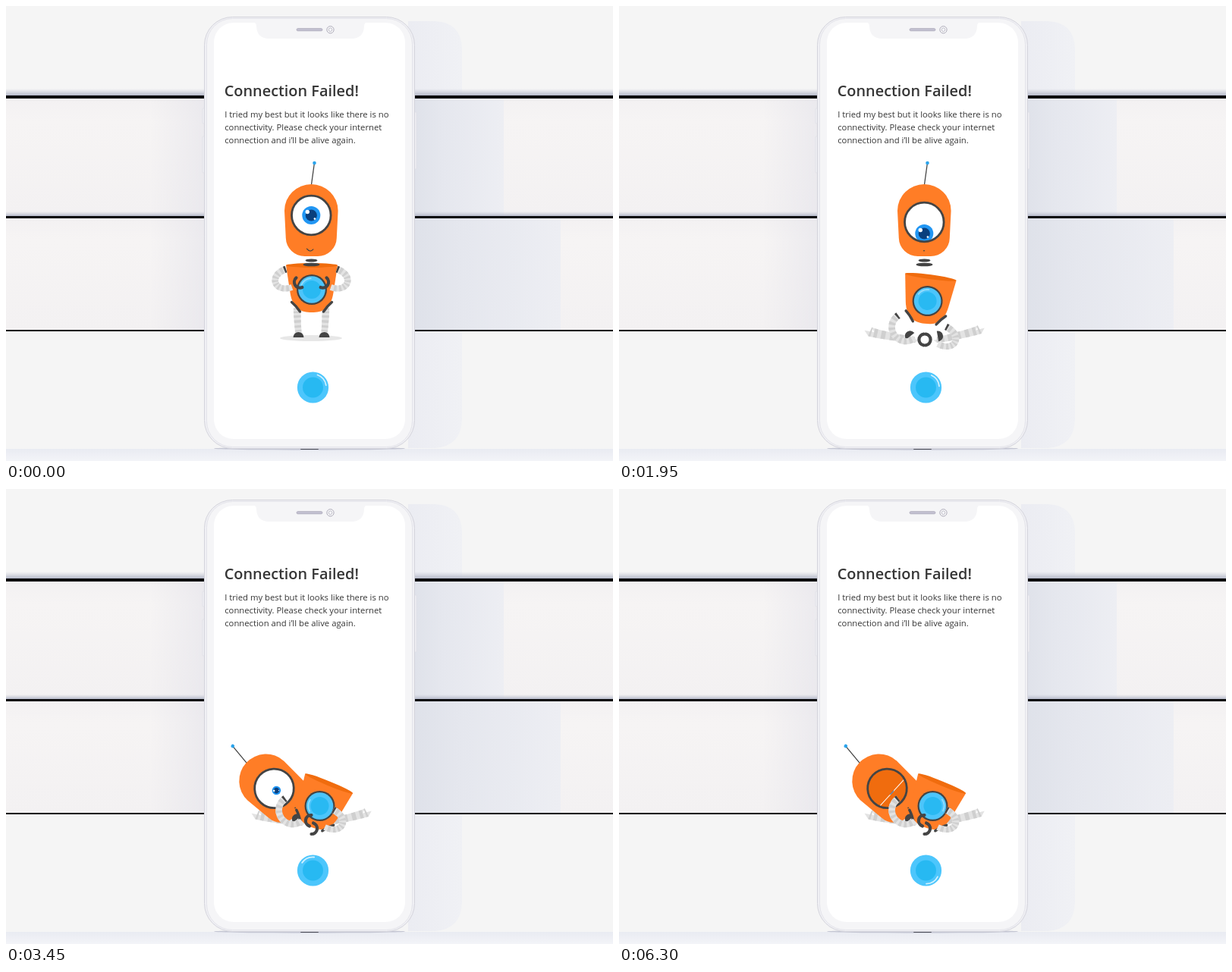
Animation, 800 px wide and 600 px high, one loop 6330 ms. Source, as an HTML page:

```html
<!DOCTYPE html>
<html lang="en">
<head>
<meta charset="utf-8">
<title>Connection Failed</title>
<style>
  html, body { margin: 0; width: 100%; height: 100%; overflow: hidden; background: #f5f5f5; }
  svg { display: block; width: 800px; height: 600px; }
  text { font-family: "Open Sans", "Noto Sans", sans-serif; fill: #363636; }
  .title { font-size: 19.9px; font-weight: 600; }
  .copy { font-size: 11.3px; }
  .dark { fill: #444; }
  .orange { fill: #ff7d26; }
  .deep { fill: #f06c0e; }
  .line { fill: none; stroke: #444; stroke-linecap: round; }
  .glint { fill: none; stroke: #fff; stroke-linecap: round; stroke-width: 1.8; opacity: .75; }
</style>
</head>
<body>
<svg viewBox="0 0 800 600">
  <defs>
    <linearGradient id="warm" x2="0" y2="1">
      <stop offset="0" stop-color="#f3f1f2"/><stop offset=".2" stop-color="#f6f4f4"/><stop offset="1" stop-color="#f3f1f2"/>
    </linearGradient>
    <linearGradient id="shade">
      <stop offset="0" stop-color="#dee1e9"/><stop offset=".35" stop-color="#e5e7ee"/><stop offset="1" stop-color="#edeef3"/>
    </linearGradient>
    <linearGradient id="soft">
      <stop offset="0" stop-color="#ebecf2"/><stop offset="1" stop-color="#f0f1f5"/>
    </linearGradient>
    <linearGradient id="near">
      <stop offset="0" stop-color="#e4e3ea" stop-opacity="0"/><stop offset="1" stop-color="#e4e3ea" stop-opacity=".6"/>
    </linearGradient>
    <linearGradient id="lip" x2="0" y2="1">
      <stop offset="0" stop-color="#c3c6d4" stop-opacity="0"/><stop offset="1" stop-color="#b4b8c8"/>
    </linearGradient>
    <linearGradient id="floor" x2="0" y2="1">
      <stop offset="0" stop-color="#e9ebf2"/><stop offset="1" stop-color="#f3f4f8"/>
    </linearGradient>
    <clipPath id="socket"><circle r="25.5"/></clipPath>
  </defs>

  <!-- wall boards and shadows -->
  <rect width="800" height="600" fill="#f5f5f5"/>
  <rect y="121" width="800" height="156" fill="url(#warm)"/>
  <rect y="279" width="800" height="149" fill="url(#warm)"/>
  <path d="M530 20H566Q600 22 601 56V116H530Z" fill="url(#soft)"/>
  <rect x="530" y="121" width="126" height="156" fill="url(#shade)"/>
  <rect x="530" y="279" width="201" height="149" fill="url(#shade)"/>
  <path d="M530 429H601V545Q600 580 566 583H530Z" fill="url(#soft)"/>
  <rect x="190" y="121" width="74" height="307" fill="url(#near)"/>
  <rect y="584" width="800" height="16" fill="url(#floor)"/>
  <g fill="url(#lip)">
    <rect y="109" width="800" height="9"/>
    <rect y="271" width="800" height="6"/>
  </g>
  <g fill="#050507">
    <rect y="118" width="800" height="4"/>
    <rect y="277" width="800" height="3"/>
    <rect y="427" width="800" height="2"/>
  </g>

  <!-- phone -->
  <ellipse cx="400" cy="583.5" rx="126" ry="2" fill="#c4c6d3"/>
  <rect x="388" y="582" width="24" height="3" rx="1" fill="#4b4c57"/>
  <g fill="#eeeef2" stroke="#dcdce4" stroke-width=".6">
    <rect x="259" y="135" width="4" height="20" rx="1"/>
    <rect x="259" y="172" width="4" height="48" rx="1"/>
    <rect x="537" y="140" width="4" height="75" rx="1"/>
  </g>
  <rect x="261.5" y="14.5" width="277" height="569" rx="37" fill="#f0f0f4" stroke="#d4d4dc"/>
  <rect x="264.5" y="16.5" width="271" height="565" rx="34" fill="#f5f5f7" stroke="#e4e4ea"/>
  <rect x="274" y="22" width="252" height="549" rx="26" fill="#fff"/>
  <path d="M326 21Q330 22 330 27Q331 43 347 43H455Q471 43 472 27Q472 22 476 21Z" fill="#f5f5f7"/>
  <rect x="383" y="29.5" width="34" height="3.4" rx="1.7" fill="#c2c0d0" stroke="#a9a7b8" stroke-width=".6"/>
  <circle cx="427.5" cy="31.3" r="4.6" fill="#fff" stroke="#a7a5b4"/>
  <circle cx="427.5" cy="31.3" r="2.4" fill="#f4f4f8" stroke="#a7a5b4" stroke-width=".7"/>

  <text class="title" x="287.7" y="119">Connection Failed!</text>
  <g class="copy">
    <text x="288.2" y="147">I tried my best but it looks like there is no</text>
    <text x="288.2" y="164">connectivity. Please check your internet</text>
    <text x="288.2" y="181">connection and i’ll be alive again.</text>
  </g>

  <ellipse id="shadow" cx="402" cy="438" rx="41" ry="4" fill="#e7e7e7"/>
  <g id="legs"></g>

  <g id="head">
    <path d="M0 -46L4 -75" class="line" stroke-width="1.3"/>
    <circle cx="4.2" cy="-76" r="2.3" fill="#2ba4ec"/>
    <path class="orange" d="M-35.3 -13A35.3 35 0 0 1 35.3 -13L33.5 23A25 24.5 0 0 1 8.5 47H-8.5A25 24.5 0 0 1 -33.5 23Z"/>
    <path id="mouth" class="line" stroke-width="1.2"/>
    <g id="eye">
      <circle r="26" fill="#fff"/>
      <g clip-path="url(#socket)">
        <g id="iris">
          <circle r="12" fill="#2196f3"/>
          <circle r="7.6" fill="#0a3f7d"/>
          <circle cx="-5" cy="-4.5" r="2.7" fill="#fff"/>
          <circle cx="4.6" cy="4.6" r="1.3" fill="#fff"/>
        </g>
        <rect id="upper" class="deep" x="-28" y="-28" width="56"/>
        <rect id="lower" class="deep" x="-28" width="56" height="56"/>
      </g>
      <circle r="25.8" class="line" stroke-width="2.8"/>
    </g>
  </g>

  <path id="footL" class="dark" d="M-7 3Q-6 -4 0 -4Q6 -4 7 3Z"/>
  <path id="footR" class="dark" d="M-7 3Q-6 -4 0 -4Q6 -4 7 3Z"/>

  <g id="body">
    <path class="orange" d="M-34 -32L-28.5 4C-25 26 -14 30 0 30S25 26 28.5 4L34 -32Z"/>
    <ellipse class="deep" cy="-32" rx="34" ry="3"/>
    <path class="line" stroke-width="3.4" d="M-26.5 16.5Q-21 21 -15.5 29M26.5 16.5Q21 21 15.5 29"/>
    <circle r="20" class="dark"/>
    <circle r="17.8" fill="#4cc5fb"/>
    <circle r="12" fill="#29b9f2"/>
    <path id="bellyGlint" class="glint" style="opacity:.4" d="M13 -7.5A15 15 0 0 1 13 7.5"/>
  </g>

  <g id="neck" class="dark">
    <ellipse id="discA" rx="8" ry="2"/>
    <ellipse id="discB" rx="11" ry="2.3"/>
  </g>

  <g id="arms"></g>
  <path id="handL" class="line" stroke-width="4.2" d="M-1.3 -7.4A7.5 7.5 0 0 0 -1.3 7.4"/>
  <path id="handR" class="line" stroke-width="4.2" d="M-1.3 -7.4A7.5 7.5 0 0 0 -1.3 7.4"/>

  <g transform="translate(404.5 503)">
    <circle r="20.6" fill="#4cc6fc"/>
    <circle r="13.5" fill="#27b9f2"/>
    <path id="glint" class="glint" d="M15.2 -8.8A17.5 17.5 0 0 1 15.2 8.8"/>
  </g>
</svg>
<script>
const LOOP = 6330, MID = 402.5;
const el = id => document.getElementById(id);
const set = (id, attrs) => { for (const k in attrs) el(id).setAttribute(k, attrs[k]); };
const place = (id, x, y, turn = 0, size = 1) =>
  set(id, { transform: `translate(${x} ${y}) rotate(${turn}) scale(${size})` });

const ramp = (t, a, b) => Math.min(1, Math.max(0, (t - a) / (b - a)));
const smooth = p => p * p * (3 - 2 * p);
const drop = p => p * p;
const lerp = (a, b, p) => a + (b - a) * p;
const mix = (a, b, p) => a.map((v, i) => lerp(v, b[i], p));
const step = (t, a, b) => smooth(ramp(t, a, b));

// A striped tube from one point to another, bowed sideways by bend
function tube(parent, stripes, cuff) {
  const [base, bands, rim] = ['#e3e3e3', '#cfcfcf', '#444'].map(fill => {
    const path = document.createElementNS('http://www.w3.org/2000/svg', 'path');
    path.setAttribute('fill', fill);
    return el(parent).appendChild(path);
  });
  return ([x0, y0, x1, y1, bend, w0, w1]) => {
    const dx = x1 - x0, dy = y1 - y0, len = Math.hypot(dx, dy);
    const nx = -dy / len, ny = dx / len;
    const rib = u => {
      const along = u * u * (3 - 2 * u), out = 3 * bend * u * (1 - u);
      const da = 6 * u * (1 - u) * len, db = 3 * bend * (1 - 2 * u);
      const tx = dx / len * da + nx * db, ty = dy / len * da + ny * db;
      const half = lerp(w0, w1, u) / 2 / (Math.hypot(tx, ty) || 1);
      const x = x0 + dx * along + nx * out, y = y0 + dy * along + ny * out;
      return [[x - ty * half, y + tx * half], [x + ty * half, y - tx * half]];
    };
    const quad = (a, b) => {
      const [l, r] = rib(a), [m, s] = rib(b);
      return `M${l}L${r}L${s}L${m}Z`;
    };
    let all = '', odd = '';
    for (let i = 0; i < stripes; i++) {
      all += quad(i / stripes, Math.min(1, (i + 1.1) / stripes));
      if (i % 2) odd += quad(i / stripes, (i + 1) / stripes);
    }
    base.setAttribute('d', all);
    bands.setAttribute('d', odd);
    if (cuff) rim.setAttribute('d', quad(0, .035));
  };
}

// Both sides stand as mirror images and land in their own pose
const sides = [
  { s: -1, name: 'L', leg: [330, 429, 391, 440, 2, 13, 7], arm: [368, 408, 390, 438, 26, 9, 8], foot: [382, 433, -38] },
  { s: 1, name: 'R', leg: [476, 426, 418, 440, -2, 12, 7], arm: [431, 423, 420, 446, -26, 9, 8], foot: [423, 435, 80] }
];
for (const side of sides) {
  side.drawLeg = tube('legs', 15);
  side.drawArm = tube('arms', 17, true);
}

function drawSide({ s, name, leg, arm, foot, drawLeg, drawArm }, fallen, landed) {
  const x = d => MID + s * d;
  drawLeg(mix([x(18.5), 399, x(16.5), 433, -s, 10, 8], leg, fallen));
  drawArm(mix([x(33.5), 347, x(25.5), 371, -s * 25, 9, 8], arm, fallen));
  place('foot' + name, ...mix([x(17), 434, 0], foot, fallen));
  const turn = s < 0 ? 0 : 180;
  const hand = mix([x(15), 364, turn + s * 32], [403, 440, turn], fallen);
  place('hand' + name, ...mix(hand, [402.5, 442.5 + s * 5, turn + 10], landed));
}

function draw(t) {
  const spin = -40 + t * .187;
  set('glint', { transform: `rotate(${spin})` });
  set('bellyGlint', { transform: `rotate(${spin - 85})` });

  // Limbs give way first, then the body, then the neck and head
  const fallen = drop(ramp(t, 1400, 1850));
  const landed = ramp(t, 2000, 2250);
  sides.forEach(side => drawSide(side, fallen, landed));
  set('shadow', { opacity: 1 - fallen });
  place('body', ...mix([403, 374, 0], [413.5, 418, 22.4], drop(ramp(t, 1600, 2200))));

  const loose = drop(ramp(t, 2250, 2620));
  place('discA', ...mix([MID, 335.5, 0], [382, 416, 6], loose));
  place('discB', ...mix([MID, 341, 0], [382, 416, 6], loose));
  set('neck', { opacity: t > 2900 ? 0 : 1 });

  const tip = mix([402.3, 283, 0], [387, 327.5, -8.5], drop(ramp(t, 2350, 2700)));
  place('head', ...mix(tip, [352, 393.5, -47.5], ramp(t, 2700, 2980)));

  // The gaze lowers, blinks, then the pupil shrinks and the eye shuts
  const look = step(t, 300, 800), shrink = step(t, 3150, 3380), shut = step(t, 3800, 4600);
  const blink = step(t, 850, 1080) - step(t, 1110, 1310);
  place('eye', 0, lerp(-7, 2, look));
  place('iris', 0, lerp(15 * look, 4, shrink), 0, lerp(1, .48, shrink));
  set('upper', { height: 47 * blink + 36 * shut });
  set('lower', { y: lerp(28, 9, shut) });

  const smile = lerp(.65, 1, look) * (1 - .93 * step(t, 1350, 1650));
  const x = -2.5 * smile, w = 6.5 * smile, y = 39.8 - 3 * smile;
  set('mouth', { d: `M${x - w} ${y - w * .15}Q${x} ${y + w * 1.1} ${x + w} ${y}` });
}

const start = performance.now();
(function frame() {
  draw((performance.now() - start) % LOOP);
  requestAnimationFrame(frame);
})();
</script>
</body>
</html>
```
